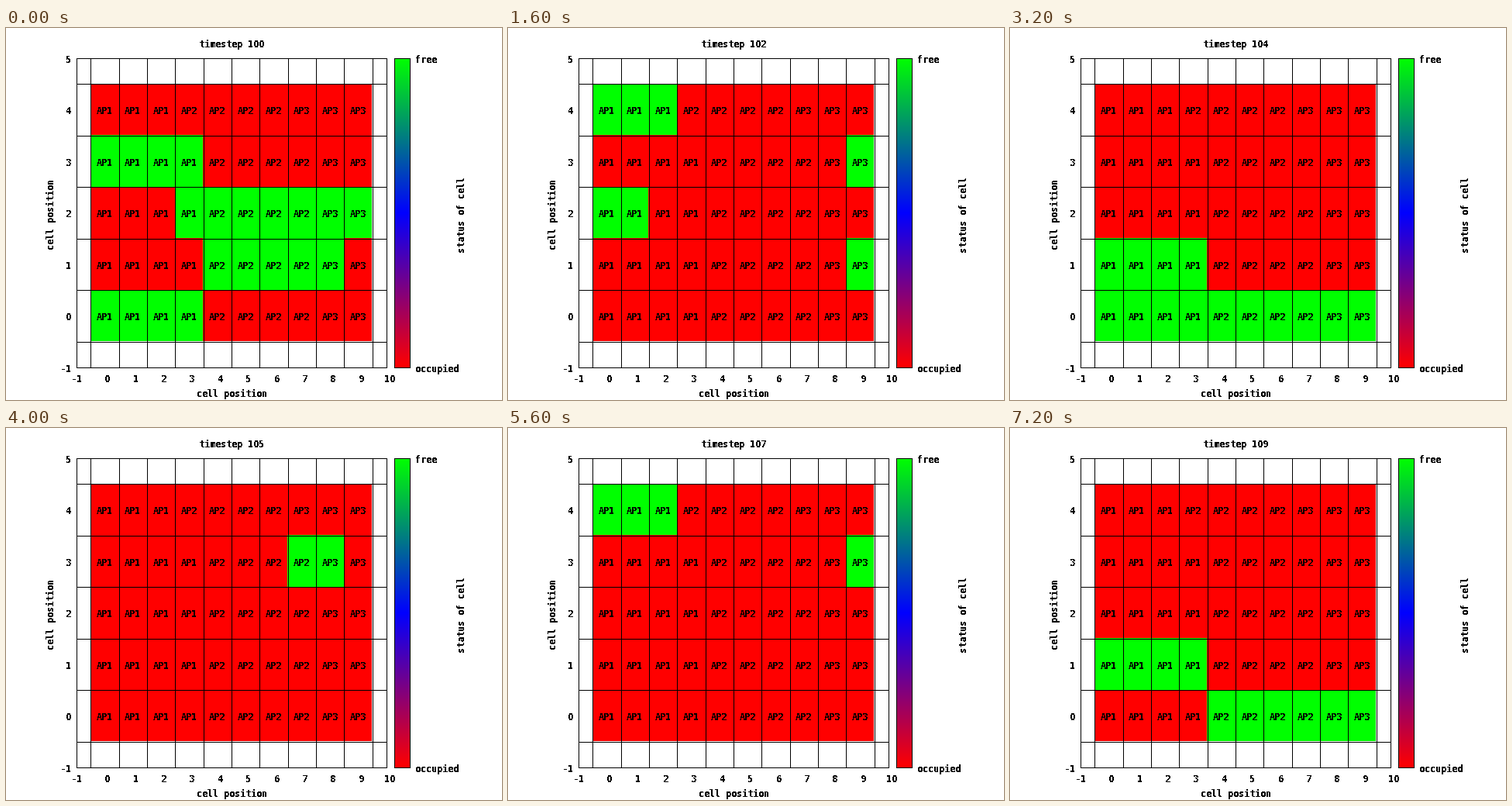
Animation of 640 by 480 pixels, one loop 8 s. Source, as a matplotlib script:

```python
import math

import matplotlib.pyplot as plt
import numpy as np
from matplotlib.animation import FuncAnimation
from matplotlib.patches import Rectangle

W, H, DPI = 640, 480, 100
COLS, ROWS = 10, 5
LEFT, RIGHT, TOP, BOTTOM = 91, 491, 39, 438
BAR_LEFT, BAR_RIGHT = 501, 521
CHAR_W = 7
FREE, OCCUPIED = "#00ff00", "#ff0000"
FIRST_STEP = 100

# Runs of cells, counted row by row from the bottom: (length, period, phase).
# A run is free whenever step % period == phase.
RUNS = [
    (4, 4, 0), (10, 5, 4), (5, 6, 4), (3, 4, 2), (1, 7, 5),
    (11, 6, 4), (3, 7, 3), (2, 6, 3), (4, 5, 2), (7, 7, 3),
]
CYCLES = [(period, phase) for n, period, phase in RUNS for _ in range(n)]

plt.rcParams.update({
    "font.family": "DejaVu Sans Mono",
    "font.weight": "bold",
    "font.size": 8.5,
    "text.antialiased": False,
    "text.hinting": "force_autohint",
    "text.hinting_factor": 1,
})

fig = plt.figure(figsize=(W / DPI, H / DPI), dpi=DPI, facecolor="white")
ax = fig.add_axes([0, 0, 1, 1])


def px(x):
    return LEFT + (x + 1) * (RIGHT - LEFT) / (COLS + 1)


def py(y):
    return BOTTOM - (y + 1) * (BOTTOM - TOP) / (ROWS + 1)


def nearest(v):
    return math.floor(v + 0.5)


def fill(x0, y0, x1, y1, color, z=1):
    rect = Rectangle((x0, y0), x1 - x0, y1 - y0, facecolor=color,
                     linewidth=0, antialiased=False, zorder=z)
    return ax.add_patch(rect)


def hline(x0, x1, y):
    fill(x0, y, x1 + 1, y + 1, "black", 3)


def vline(x, y0, y1):
    fill(x, y0, x + 1, y1 + 1, "black", 3)


def frame(x0, x1):
    hline(x0, x1, TOP)
    hline(x0, x1, BOTTOM)
    vline(x0, TOP, BOTTOM)
    vline(x1, TOP, BOTTOM)


def plain(s):
    # The font dots its zero; the capital O gives an open one.
    return s.replace("0", "O")


def label(x, base, s, rotation=0):
    return ax.text(x, base, plain(s), rotation=rotation, ha="left",
                   va="baseline", color="black", zorder=4)


def vlabel(base, bottom, s):
    ax.text(base, bottom, s, rotation=90, rotation_mode="anchor",
            ha="left", va="baseline", color="black", zorder=4)


def row_base(y):
    return math.floor(py(y)) + 6


def zone(col, row):
    first, second = (3, 7) if row == ROWS - 1 else (4, 8)
    return "AP" + str(1 + (col >= first) + (col >= second))


def draw_cells():
    cells = []
    for row in range(ROWS):
        for col in range(COLS):
            x0, x1 = (math.floor(px(col + d)) for d in (-0.5, 0.5))
            y0, y1 = (math.floor(py(row + d)) for d in (0.5, -0.5))
            cells.append(fill(x0, y0, x1, y1, OCCUPIED, 2))
            text_x = nearest(px(col) - 1.5 * CHAR_W)
            label(text_x, row_base(row), zone(col, row))
    return cells


def draw_axes():
    frame(LEFT, RIGHT)
    for i in range(COLS + 1):
        vline(nearest(px(i - 0.5)), TOP, BOTTOM)
    for i in range(ROWS + 1):
        hline(LEFT, RIGHT, nearest(py(i - 0.5)))

    for i in range(-1, COLS + 1):
        width = 2 if i < COLS else 3
        pad = 0 if i < 0 else CHAR_W
        label(nearest(px(i) - width * CHAR_W / 2) + pad, 457, str(i))
    for i in range(-1, ROWS + 1):
        label(84 - CHAR_W * len(str(i)), row_base(i), str(i))

    label(246, 476, "cell position")
    vlabel(62, 286, "cell position")


def draw_colorbar():
    t = np.linspace(1, 0, BOTTOM - TOP)
    ramp = np.stack([np.clip(1 - 2 * t, 0, 1),
                     np.clip(2 * t - 1, 0, 1),
                     1 - np.abs(2 * t - 1)], axis=1)
    ax.imshow(ramp[:, None, :], extent=(BAR_LEFT, BAR_RIGHT, BOTTOM, TOP),
              interpolation="nearest", aspect="auto", zorder=1)
    frame(BAR_LEFT, BAR_RIGHT)
    label(528, row_base(ROWS), "free")
    label(528, row_base(-1), "occupied")
    vlabel(592, 290, "status of cell")


draw_colorbar()
draw_axes()
cells = draw_cells()
title = label(249, 25, "")
ax.set(xlim=(0, W), ylim=(H, 0))
ax.axis("off")


def update(i):
    step = FIRST_STEP + i
    title.set_text(plain(f"timestep {step}"))
    for cell, (period, phase) in zip(cells, CYCLES):
        cell.set_facecolor(FREE if step % period == phase else OCCUPIED)
    return [title, *cells]


anim = FuncAnimation(fig, update, frames=10, interval=800,
                     init_func=lambda: update(0), repeat=True, repeat_delay=0)
plt.show()
```
